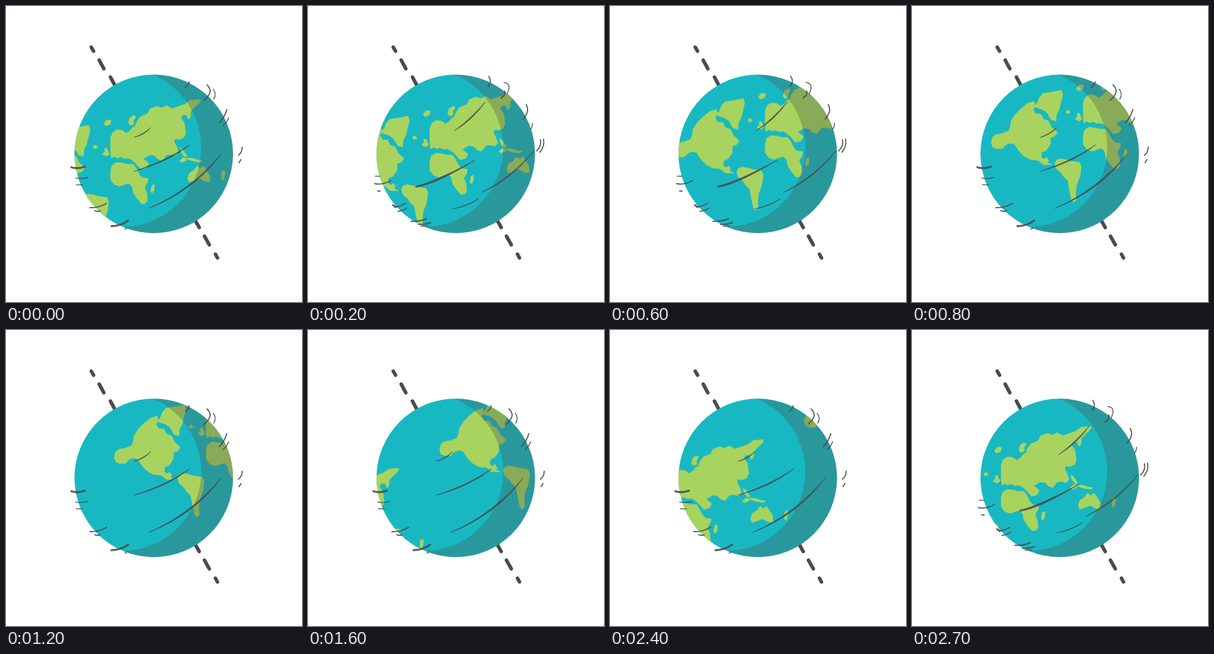
Animation of 480x480 px, one loop 2.8 s. Source, as an HTML page:

```html
<!DOCTYPE html>
<html lang="en">
<head>
<meta charset="utf-8">
<title>Spinning globe</title>
<style>
html, body { margin: 0; width: 100%; height: 100%; overflow: hidden; background: #fff; }
svg { display: block; width: 100vw; height: 100vh; }
.axis { fill: none; stroke: #4b4b4d; stroke-width: 5.8; stroke-linecap: round; }
.land { fill: #a8d35e; stroke: #a8d35e; stroke-width: 1.6; stroke-linejoin: round; }
.spin { animation: spin 2.8s infinite; }
.lines { fill: none; stroke: #48484a; stroke-opacity: .85; stroke-width: 2; stroke-linecap: round; animation: swap .4s step-end infinite; }
.lines .bold { stroke-width: 3.4; }
.lines .thin { stroke-width: 1.6; }
.lines .taper { fill: #48484a; fill-opacity: .85; stroke-width: .8; }
.second { animation-delay: -.2s; }

@keyframes spin {
  0% { transform: translate(0, 0); animation-timing-function: steps(4); }
  14.285% { transform: translate(56px, -30px); animation-timing-function: steps(4); }
  28.571% { transform: translate(108px, -57px); animation-timing-function: steps(4); }
  42.857% { transform: translate(155px, -72px); animation-timing-function: steps(4); }
  57.142% { transform: translate(193px, -84.5px); animation-timing-function: steps(4); }
  71.428% { transform: translate(239px, -102px); animation-timing-function: steps(7); }
  96.428% { transform: translate(336px, -152px); animation-timing-function: step-end; }
  100% { transform: translate(361px, -157px); }
}
@keyframes swap {
  0% { visibility: visible; }
  50%, 100% { visibility: hidden; }
}
</style>
</head>
<body>
<svg viewBox="0 0 480 480">
  <defs>
    <clipPath id="disc"><circle cx="239.5" cy="239.8" r="128.5"/></clipPath>
    <g id="world" class="land">
      <!-- Eurasia -->
      <path d="M171 246L170 233 170 214 173 206 180 201 188 202 195 207 201 203 205 198 210 195 213 187 218 180 230 175 234 167 245 163 252 166 260 162 269 167 278 164 290 160 300 153 315 152 313 157 305 164 299 171 299 179 296 183 293 176 286 176 283 182 289 190 291 206 288 213 281 216 274 215 272 220 277 230 279 237 275 242 268 240 260 241 253 250 247 248 241 242 232 241 226 245 221 247 231 255 227 262 219 264 212 256 204 249 198 246 192 247 186 244 180 246 176 243Z"/>
      <path d="M199 190L201 182 207 178 210 180 206 186 207 191 202 193Z"/>
      <path d="M159 191L164 185 170 186 168 192 162 194ZM142 228L146 226 148 230 143 231ZM157 240L161 236 160 232 163 231 167 240 163 243Z"/>
      <!-- Africa -->
      <path d="M170 268L172 259 179 254 189 255 197 257 206 257 211 264 216 274 221 279 230 280 229 286 224 294 228 304 229 315 225 320 220 320 213 312 207 303 205 293 200 287 192 289 184 292 176 289 170 281Z"/>
      <path d="M237 291L240 290 240 298 237 303 235 300Z"/>
      <!-- Oceania -->
      <path d="M283 231L287 234 293 243 290 244 285 238ZM282 251L288 246 292 250 285 253ZM291 247L302 247 310 250 318 251 314 253 303 251Z"/>
      <path d="M295 279L298 271 305 267 310 260 315 264 320 260 324 266 330 275 330 285 323 284 314 279 304 283 297 285Z"/>
      <path d="M350 269L354 267 355 272 352 282 350 280Z"/>
      <!-- Americas -->
      <g transform="translate(-108 57)">
        <path d="M129 222L131 213 136 209 147 207 157 203 160 195 161 187 168 176 178 166 188 158 198 155 199 161 196 168 200 175 209 176 213 184 221 187 226 197 235 205 231 211 224 213 224 224 217 234 210 237 209 246 215 249 218 246 221 251 219 255 226 257 214 257 205 250 193 249 182 243 174 235 167 224 160 222 153 224 146 231 137 231 131 228Z"/>
        <path d="M198 163L204 157 207 149 213 142 227 140 242 137 244 144 241 156 238 168 234 175 233 186 226 184 219 172 211 167Z"/>
        <path d="M232 255L235 250 241 248 251 250 258 252 271 254 274 260 272 276 266 292 265 305 266 314 262 317 259 314 257 304 253 283 246 276 243 271 234 263Z"/>
      </g>
    </g>
  </defs>

  <path class="axis" d="M138.3 66.8l3.6 6.4M151.2 87.8l7.4 13.8M169.4 115.4l7.4 13.8M307.3 348.5l6 10.6M321.9 373.3l7.7 13.8M339.7 402.5l3.2 6"/>

  <circle cx="239.5" cy="239.8" r="128.5" fill="#18b8c3"/>
  <g clip-path="url(#disc)">
    <g class="spin">
      <use href="#world"/>
      <use href="#world" x="-361" y="157"/>
    </g>
  </g>
  <path fill="#4d584c" fill-opacity=".33" d="M238.2 111.4A128.5 128.5 0 1 1 189.8 358.2A128.5 128.5 0 0 0 238.2 111.4Z"/>

  <g class="lines">
    <path class="taper" d="M208 213Q224 207 235 197Q225 209 208 213Z"/>
    <path class="taper" d="M208 268Q258 252 298 225Q264 253 208 268Z"/>
    <path class="taper" d="M232 328Q300 298 349 240Q305 300 232 328Z"/>
    <path d="M297 123Q297 127 291 132M326 128Q338 139 321 153M358 168Q355 180 346 189M383 229Q383 237 377 242M381 249L378 254"/>
    <path class="thin" d="M336 135Q342 142 337 151M361 181Q359 188 352 194M113 279Q122 281 133 278M114 290H124M193 362L196 360"/>
    <path class="bold" d="M106 261.5Q116 265 128 260.5M171 357Q186 357 198 348"/>
    <path d="M136 327Q149 328 163 320M144 332Q149 334 153 332"/>
  </g>

  <g class="lines second">
    <path class="taper" d="M238 202Q265 182 288 155Q267 185 238 202Z"/>
    <path class="taper" d="M175 292Q204 286 271 250Q208 289 175 294Z"/>
    <path class="taper" d="M282 302Q330 278 367 234Q331 281 282 302Z"/>
    <path class="taper" d="M235 329Q258 324 277 312Q260 325 235 329Z"/>
    <path d="M293 114Q299 122 292 130M319 138Q321 145 313 149M354 160Q360 171 349 183M377 217Q379 227 371 235M382 216Q384 228 376 237"/>
    <path class="thin" d="M318 124Q331 126 323 142M364 190Q364 196 361 200M109 276H117M183 357H194"/>
    <path d="M108 288Q120 291 134 283M113 300H117M146 333Q154 332 160 328M167 349Q180 350 192 345M179 354Q190 355 199 351"/>
    <path class="bold" d="M138 323L142 326"/>
    <path d="M142 326Q150 325 158 320"/>
  </g>
</svg>
</body>
</html>
```
